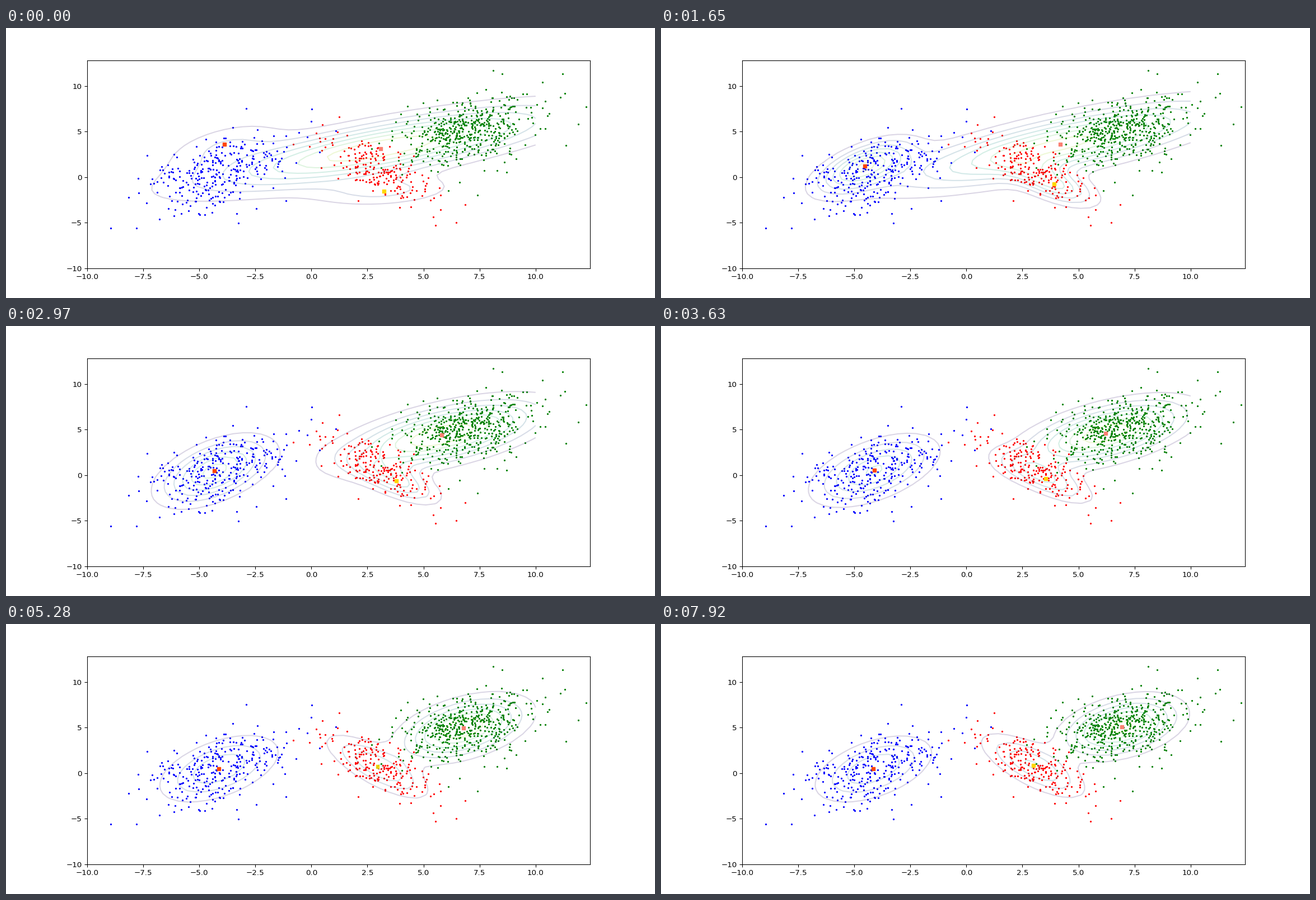
Write a matplotlib script that moves like this. It is 1159 px wide and 483 px high and loops after 8 s.

```python
"""Expectation-maximisation fitting three Gaussians to a scatter of points."""
import numpy as np
import matplotlib.pyplot as plt
from matplotlib.animation import FuncAnimation

W, H, DPI = 1159, 483, 96
LOOP, TICK, STEP = 8000, 40, 330          # milliseconds

rng = np.random.RandomState(7)


def sym(vx, vy, c):
    return np.array([[vx, c], [c, vy]])


def cluster(count, mean, cov, strays):
    """Random Gaussian points and a few strays, with exact joint moments."""
    mean, strays = np.array(mean), np.array(strays)
    core = count - len(strays)
    core_mean = (count * mean - strays.sum(axis=0)) / core
    moment = count * (cov + np.outer(mean, mean)) - strays.T @ strays
    core_cov = moment / core - np.outer(core_mean, core_mean)
    pts = rng.randn(core, 2)
    pts -= pts.mean(axis=0)
    whiten = np.linalg.inv(np.linalg.cholesky(np.cov(pts.T, bias=True)))
    pts = pts @ whiten.T @ np.linalg.cholesky(core_cov).T + core_mean
    return np.vstack([pts, strays])


def densities(pts, weights, means, covs):
    """Weighted density of every component at every point."""
    out = []
    for w, m, c in zip(weights, means, covs):
        d = pts - m
        k2 = np.sum(d @ np.linalg.inv(c) * d, axis=-1)
        out.append(w * np.exp(-k2 / 2) / (2 * np.pi * np.sqrt(np.linalg.det(c))))
    return np.array(out)


def em_step(pts, state):
    """One round of expectation and maximisation."""
    resp = densities(pts, *state)
    resp /= resp.sum(axis=0)
    total = resp.sum(axis=1)
    means = resp @ pts / total[:, None]
    covs = [(r[:, None] * (pts - m)).T @ (pts - m) / t
            for r, m, t in zip(resp, means, total)]
    return total / len(pts), means, np.array(covs)


blue = cluster(300, (-4.11, 0.50), sym(2.6, 5.0, 1.85),
               [(-8.15, -2.2), (-7.8, -5.6), (-3.25, -5.05), (-2.9, 7.5),
                (0.0, 6.1), (1.1, 5.1)])
red = cluster(200, (2.99, 0.78), sym(1.64, 3.96, -1.78),
              [(6.45, -5.0), (6.85, -3.0), (5.75, -3.6), (0.5, 5.75),
               (-0.8, 3.6)])
green = cluster(500, (6.95, 5.08), sym(2.2, 3.76, 1.01),
                [(8.1, 11.7), (8.5, 11.3), (11.3, 9.2), (11.35, 3.5),
                 (7.4, -1.95), (6.1, -1.5)])
points = np.vstack([blue, red, green])

# Weights, means and covariances of the first guess
states = [(np.array([0.055, 0.885, 0.06]),
           np.array([(-3.87, 3.63), (3.10, 3.14), (3.25, -1.55)]),
           np.array([sym(3.0, 2.9, 1.6), sym(25, 8.1, 11.08),
                     sym(4.2, 1.2, 0.6)]))]
for _ in range(LOOP // STEP):
    states.append(em_step(points, states[-1]))

axis = np.linspace(-10, 10, 50)
GX, GY = np.meshgrid(axis, axis)
grid = np.dstack([GX, GY])

fig, ax = plt.subplots(figsize=(W / DPI, H / DPI), dpi=DPI)
fig.subplots_adjust(left=0.125, right=0.9, bottom=0.11, top=0.88)
ax.set_xlim(-10, 12.43)
ax.set_ylim(-10, 12.80)
ax.set_xticks(np.arange(-10, 11, 2.5))
ax.set_yticks(np.arange(-10, 11, 5))

for pts, color in ((blue, "blue"), (red, "red"), (green, "green")):
    ax.scatter(*pts.T, s=2, c=color)
centres = ax.scatter(*states[0][1].T, s=20, marker="s", zorder=1.5,
                     c=["orangered", "salmon", "gold"])
shown = {"step": None, "lines": None}


def update(i):
    step = (i * TICK + TICK - 1) // STEP
    if step == shown["step"]:
        return []
    if shown["lines"] is not None:
        shown["lines"].remove()
    z = densities(grid, *states[step]).sum(axis=0)
    shown["lines"] = ax.contour(GX, GY, z, cmap="viridis", alpha=0.2)
    shown["step"] = step
    centres.set_offsets(states[step][1])
    return []


anim = FuncAnimation(fig, update, frames=LOOP // TICK, interval=TICK,
                     repeat=True, repeat_delay=0)
plt.show()
```
